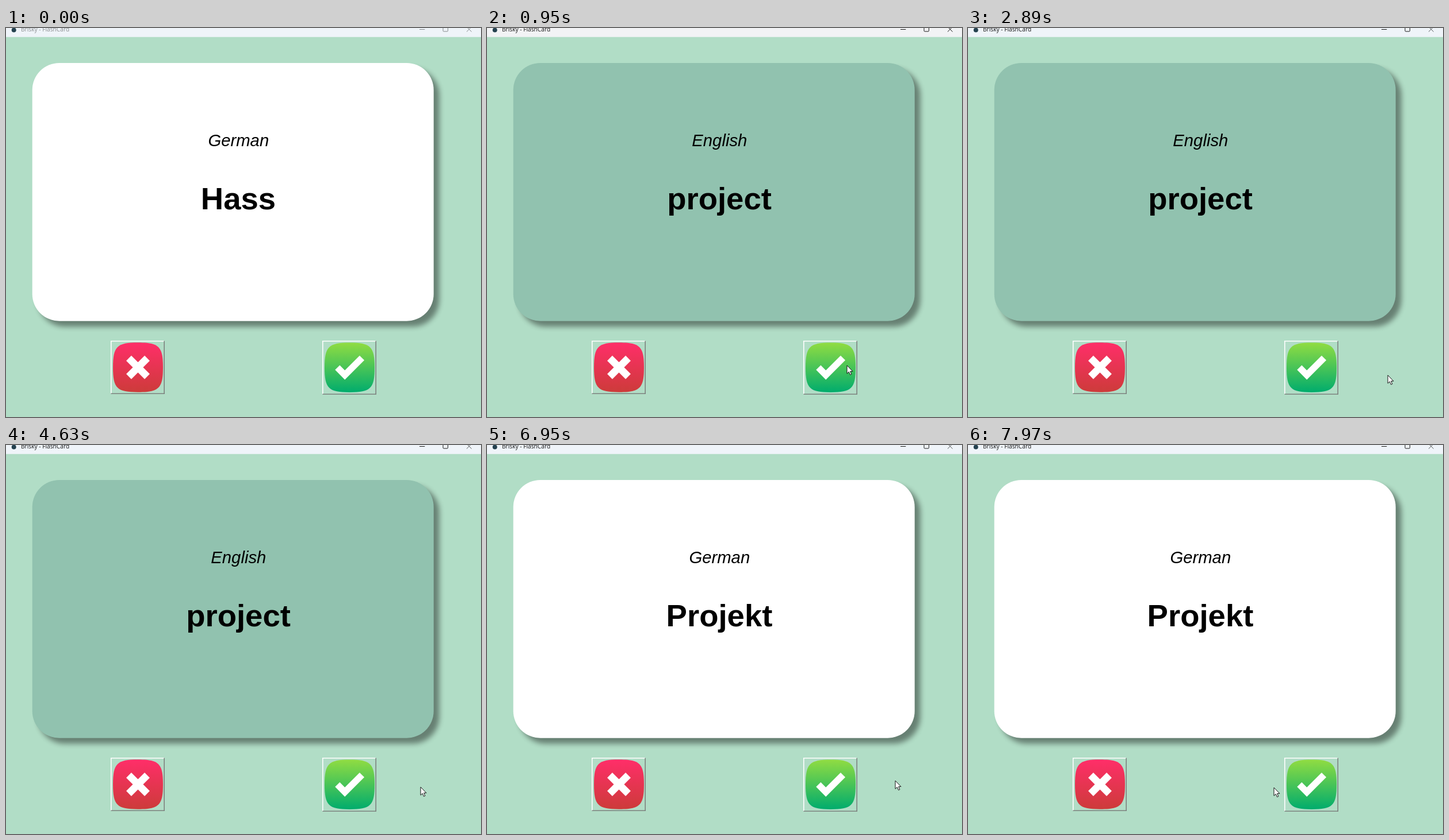
An HTML page that plays this animation: 826 by 678 pixels, repeating every 8000 ms.

```html
<!DOCTYPE html>
<html lang="en">
<head>
<meta charset="utf-8">
<title>Flash cards</title>
<style>
  html, body { margin: 0; width: 100%; height: 100%; overflow: hidden; background: #b1ddc6; }
  svg { display: block; width: 826px; height: 678px; }
  .title { font: 10.2px "Open Sans", "Noto Sans", sans-serif; }
  .lang { font: italic 29.3px "Liberation Sans", Arial, sans-serif; text-anchor: middle; }
  .word { font: bold 54.5px "Liberation Sans", Arial, sans-serif; text-anchor: middle; }
</style>
</head>
<body>
<svg viewBox="0 0 826 678" xmlns="http://www.w3.org/2000/svg">
  <defs>
    <linearGradient id="red" x2="0" y2="1">
      <stop stop-color="#ff2e69"/><stop offset="1" stop-color="#cd3b3a"/>
    </linearGradient>
    <linearGradient id="green" x2="0" y2="1">
      <stop stop-color="#90dc42"/><stop offset="1" stop-color="#00ac6d"/>
    </linearGradient>
    <filter id="blur" x="-10%" y="-10%" width="120%" height="120%">
      <feGaussianBlur stdDeviation="4.6"/>
    </filter>
    <path id="blob" d="M-43.5 0C-43.5-36.5-36.5-43.2 0-43.2S43.5-36.5 43.5 0 36.5 43.2 0 43.2-43.5 36.5-43.5 0Z"/>
  </defs>

  <rect width="826" height="678" fill="#b1ddc6"/>

  <rect id="bar" width="826" height="15.7"/>
  <circle cx="13.7" cy="3.6" r="4" fill="#24414f"/>
  <text id="title" class="title" x="26" y="6">Brisky - FlashCard</text>
  <g id="controls" fill="none">
    <path d="M719 2.5H728.3"/>
    <rect x="760" y="-2.4" width="8.4" height="8.4" rx="1.2"/>
    <path id="close" d="M801-2L809.6 6.5M809.6-2L801 6.5"/>
  </g>

  <rect x="55.5" y="70.5" width="698" height="450" rx="47" opacity=".42" filter="url(#blur)"/>
  <rect id="card" x="45.7" y="61" width="698" height="449.7" rx="47"/>
  <text id="lang" class="lang" x="404.3" y="206"/>
  <text id="word" class="word" x="404" y="316"/>

  <g fill="none" stroke-width="1.6">
    <path d="M182.8 637V545.8H275" stroke="#fff"/>
    <path d="M275.2 545.5V637.2H182.5" stroke="#7d827f"/>
  </g>
  <g transform="translate(229.5 591.5)">
    <use href="#blob" fill="url(#red)"/>
    <path d="M-16-16L16 16M16-16L-16 16" stroke="#fff" stroke-width="12.6"/>
  </g>

  <g fill="none" stroke-width="1.6">
    <path id="edgeTop" d="M550.8 638V545.8H643"/>
    <path id="edgeLow" d="M643.2 545.5V638.2H550.5"/>
  </g>
  <g id="tick">
    <use href="#blob" fill="url(#green)"/>
    <path d="M-21.2 0L-8.3 13L21.5-16.8" fill="none" stroke="#fff" stroke-width="11.4"/>
  </g>

  <circle id="spot" cx="625" cy="587.5" r="10.8" fill="#b8d818" opacity=".78"/>
  <path id="cursor" d="M.6.7V14.9L3.9 11.9 6.1 17.1 8.4 16.1 6.3 11H10.5Z"
        fill="#fff" stroke="#111" stroke-width="1" stroke-linejoin="round"/>
</svg>
<script>
const LOOP = 8000, PRESS = 880, RELEASE = 950, FLIP = 6950;
const el = id => document.getElementById(id);
const set = (id, attrs) => {
  for (const key in attrs) el(id).setAttribute(key, attrs[key]);
};

const linear = p => p;
const out = p => 1 - (1 - p) ** 2;
const smooth = p => p * p * (3 - 2 * p);

// first step, last step, step count, destination, easing
const start = [745, 638];
const moves = [
  [70, 550, 8, [625, 587], out],
  [1550, 1610, 2, [732, 604], linear],
  [2890, 2960, 2, [725, 604], linear],
  [4560, 4630, 2, [720, 595], linear],
  [5560, 5630, 2, [717, 594], linear],
  [6290, 6420, 3, [709, 584], linear],
  [7220, 7620, 7, [378, 594], smooth],
  [7700, 7970, 4, [531, 596], smooth]
];

// share of a stepped change done at time t
function progress(t, first, last, count) {
  if (t < first) return 0;
  const gap = (last - first) / (count - 1);
  return Math.min(count, Math.floor((t - first) / gap + 1e-6) + 1) / count;
}

function cursorAt(t) {
  let pos = start;
  for (const [first, last, count, to, ease] of moves) {
    if (t < first) break;
    const p = ease(progress(t, first, last, count));
    pos = pos.map((v, i) => v + (to[i] - v) * p);
  }
  return pos;
}

function barColor(t) {
  const tint = t < PRESS ? 1 - progress(t, 70, 550, 8) : progress(t, RELEASE, 1150, 4);
  return `rgb(${243 - 4 * tint},${243 + tint},${243 + 6 * tint})`;
}

function draw(t) {
  const active = t >= PRESS;
  const down = active && t < RELEASE;
  const back = t >= RELEASE && t < FLIP;

  set("bar", { fill: barColor(t) });
  set("title", { fill: active ? "#161616" : "#8c8f92" });
  set("controls", { stroke: active ? "#161616" : "#85888b" });
  set("close", { stroke: t < PRESS ? "#85888b" : t < 1150 ? "#161616" : "#55585b" });

  set("card", { fill: back ? "#91c2af" : "#fff" });
  el("lang").textContent = back ? "English" : "German";
  el("word").textContent = back ? "project" : t < PRESS || down ? "Hass" : "Projekt";

  set("edgeTop", { stroke: down ? "#7d827f" : "#fff" });
  set("edgeLow", { stroke: down ? "#fff" : "#7d827f" });
  set("tick", { transform: down ? "translate(598.5 592.8)" : "translate(597.5 591.8)" });

  set("spot", { visibility: down ? "visible" : "hidden" });
  set("cursor", {
    visibility: t < 70 ? "hidden" : "visible",
    transform: `translate(${cursorAt(t).map(v => Math.round(v) + 0.4)})`
  });
}

const origin = performance.now();
function tick() {
  draw((performance.now() - origin) % LOOP);
  requestAnimationFrame(tick);
}
draw(0);
requestAnimationFrame(tick);
</script>
</body>
</html>
```
